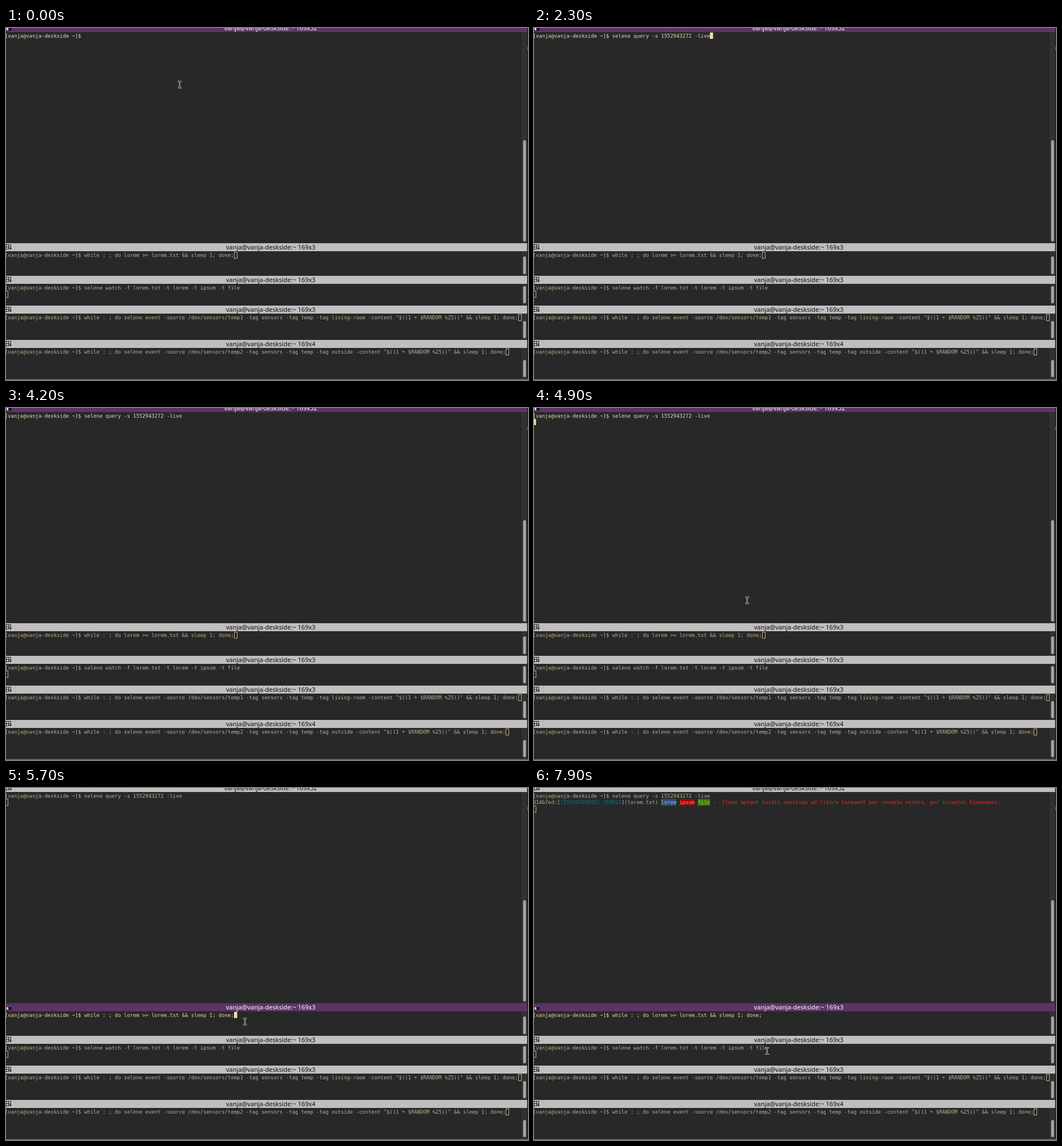
These frames come from a looping animation (911x615 px, 8000 ms). An HTML page with a canvas:

```html
<!DOCTYPE html>
<html lang="en">
<head>
<meta charset="utf-8">
<title>Terminals</title>
<style>
html, body { margin: 0; width: 100%; height: 100%; overflow: hidden; background: #282828; }
canvas { display: block; width: 911px; height: 615px; }
</style>
</head>
<body>
<canvas id="stage" width="911" height="615"></canvas>
<script>
const ctx = document.getElementById('stage').getContext('2d');
const LOOP = 8000;
const COL = 5.331, LEFT = -2.1, ROW = 11.4;
const MONO = '"DejaVu Sans Mono", monospace';
const SANS = '"Noto Sans", "Open Sans", sans-serif';
const BG = '#282828', BRIGHT = '#ebdbb2', DIM = '#bcaf8e';
const PURPLE = '#5c3566', GREY = '#c0bebf';

const HOST = 'vanja@vanja-deskside';
const PROMPT = `[${HOST} ~]$ `;
const QUERY = 'selene query -s 1552943272 -live';
const sensor = (id, place) => 'while : ; do selene event -source /dev/sensors/temp' + id +
  ' -tag sensors -tag temp -tag ' + place + ' -content "$((1 + $RANDOM %25))" && sleep 1; done;';

// top and bottom of the terminal area, scrollbar thumb, title size
const panes = [
  { top: 7, end: 376, thumb: [196, 373], size: '169x32' },
  { top: 390, end: 433, thumb: [399, 430], size: '169x3', cmd: 'while : ; do lorem >> lorem.txt && sleep 1; done;' },
  { top: 447, end: 485, thumb: [451, 481], size: '169x3', cmd: 'selene watch -f lorem.txt -t lorem -t ipsum -t file' },
  { top: 499, end: 545, thumb: [512, 542], size: '169x3', cmd: sensor(1, 'living-room') },
  { top: 559, end: 613, thumb: [580, 610], size: '169x4', cmd: sensor(2, 'outside') }
];

// [time, x, y]; no position means the pointer is hidden
const pointer = [
  [0, 303, 99], [1400],
  [4400, 304, 111], [4500, 325, 160], [4600, 347, 209],
  [4800, 360, 278], [4900, 372, 336],
  [5100, 395, 371], [5200, 413, 400],
  [5400, 415, 404], [5500, 417, 408], [7200],
  [7900, 406.7, 459.5]
];

// [time, pane, column, row]; no place means the blink is off
const cursor = [
  [0], [400, 0, 26, 0], [1000], [1500, 0, 31, 0], [2300, 0, 58, 0], [2800],
  [3500, 0, 0, 1], [4200], [4800, 0, 0, 1], [5400],
  [5700, 1, 75, 0], [6300], [6900, 1, 75, 0], [7300, 1, 0, 1], [7800]
];

const at = (steps, t) => steps.filter(s => s[0] <= t).pop();
const colX = c => LEFT + c * COL;
const rowY = (pane, r) => pane.top + 1 + r * ROW;

function rect(x, y, w, h, color) {
  ctx.fillStyle = color;
  ctx.fillRect(x, y, w, h);
}

// Oversized font scaled down keeps fractional advances exact.
function text(str, x, y, size, family, color, weight = '') {
  ctx.save();
  ctx.translate(x, y);
  ctx.scale(0.1, 0.1);
  ctx.font = `${weight} ${size * 10}px ${family}`;
  ctx.fillStyle = color;
  ctx.fillText(str, 0, 0);
  ctx.restore();
}

function term(str, pane, col, row, color, weight) {
  text(str, colX(col), rowY(pane, row) + 9, 8.855, MONO, color, weight);
}

function hollow(pane, col, row) {
  const x = Math.round(colX(col)), y = Math.round(rowY(pane, row));
  ctx.strokeStyle = DIM;
  ctx.lineWidth = 1;
  ctx.strokeRect(x + 0.5, y + 0.5, 5, 11);
}

function icon(y, active) {
  if (active) {
    rect(0, y + 2, 10, 10, '#33203a');
    rect(1, y + 3, 3, 3, '#d81818');
    rect(5, y + 3, 4, 3, '#2868b8');
    rect(1, y + 7, 3, 4, '#eeeeee');
    rect(5, y + 7, 4, 4, '#201424');
    return;
  }
  ctx.strokeStyle = '#222';
  ctx.lineWidth = 1;
  ctx.strokeRect(0.5, y + 2.5, 8, 8);
  rect(0, y + 6, 9, 1, '#222');
  rect(4, y + 2, 1, 9, '#222');
  rect(5, y + 7, 5, 5, GREY);
  ctx.fillStyle = '#222';
  ctx.beginPath();
  ctx.moveTo(5, y + 8);
  ctx.lineTo(10.5, y + 8);
  ctx.lineTo(7.7, y + 11.5);
  ctx.fill();
}

function frame(pane, active) {
  const y = pane.top - 14;
  rect(0, y, 909.5, 14, active ? PURPLE : GREY);
  icon(y, active);
  if (!active) rect(15, y, 1, 14, '#b6b4b5');
  const label = `${HOST}:~ ${pane.size}`;
  const x = pane.size.length > 5 ? 380.7 : 384;
  text(label, x, pane.top - 3, 10.95, SANS, active ? '#ffffff' : '#101010');
  rect(900, pane.top, 9.5, pane.end - pane.top, '#313131');
  ctx.fillStyle = '#a6a6a6';
  ctx.beginPath();
  ctx.roundRect(902.5, pane.thumb[0], 5, pane.thumb[1] - pane.thumb[0], 2.5);
  ctx.fill();
}

function tag(str, col, color) {
  rect(colX(col), rowY(panes[0], 1), str.length * COL, ROW, color);
  term(str, panes[0], col, 1, DIM);
}

function logLine() {
  const p = panes[0];
  term('d14b7ed:[', p, 0, 1, DIM);
  term('1552943998951.749023', p, 9, 1, '#057a7b');
  term('](lorem.txt)', p, 29, 1, DIM);
  tag('lorem', 42, '#2a5183');
  tag('ipsum', 48, '#a30000');
  tag('file', 54, '#3e7b05');
  term('-', p, 59, 1, DIM);
  term('Class aptent taciti sociosqu ad litora torquent per conubia nostra, per inceptos himenaeos.',
    p, 62, 1, '#bf2121', 'bold');
}

function beam(x, y) {
  const shape = (color, width) => {
    ctx.strokeStyle = color;
    ctx.lineWidth = width;
    ctx.beginPath();
    for (const s of [-1, 1]) {
      ctx.moveTo(x - 2, y + s * 5.5);
      ctx.lineTo(x + 2, y + s * 5.5);
    }
    ctx.moveTo(x, y - 5.5);
    ctx.lineTo(x, y + 5.5);
    ctx.stroke();
  };
  ctx.lineCap = 'square';
  shape('#e8e8e8', 2.2);
  shape('#181818', 0.9);
  ctx.lineCap = 'butt';
}

function draw(t) {
  const focus = t < 5700 ? 0 : 1;
  rect(0, 0, 911, 615, BG);
  panes.forEach((p, i) => {
    frame(p, i === focus);
    const cmd = i ? p.cmd : t < 1500 ? '' : t < 2300 ? 'clear' : QUERY;
    term(PROMPT + cmd, p, 0, 0, i === focus ? BRIGHT : DIM);
    if (i === focus) return;
    if (i === 0) hollow(p, 0, t < 7300 ? 1 : 2);
    else if (i === 2) hollow(p, 0, 1);
    else hollow(p, PROMPT.length + cmd.length, 0);
  });
  if (t >= 7300) logLine();

  const [, pane, col, row] = at(cursor, t);
  if (pane !== undefined) {
    const x = Math.round(colX(col));
    rect(x, Math.round(rowY(panes[pane], row)), 5.5, 11, BRIGHT);
  }

  rect(910, 0, 1, 613, '#1c1c1c');
  rect(910, 33, 1, 6, '#b45a28');
  rect(0, 613.5, 911, 1.5, '#2f80b0');

  const [, x, y] = at(pointer, t);
  if (x !== undefined) beam(x, y);
}

const start = performance.now();
function tick() {
  draw((performance.now() - start) % LOOP);
  requestAnimationFrame(tick);
}
tick();
</script>
</body>
</html>
```
